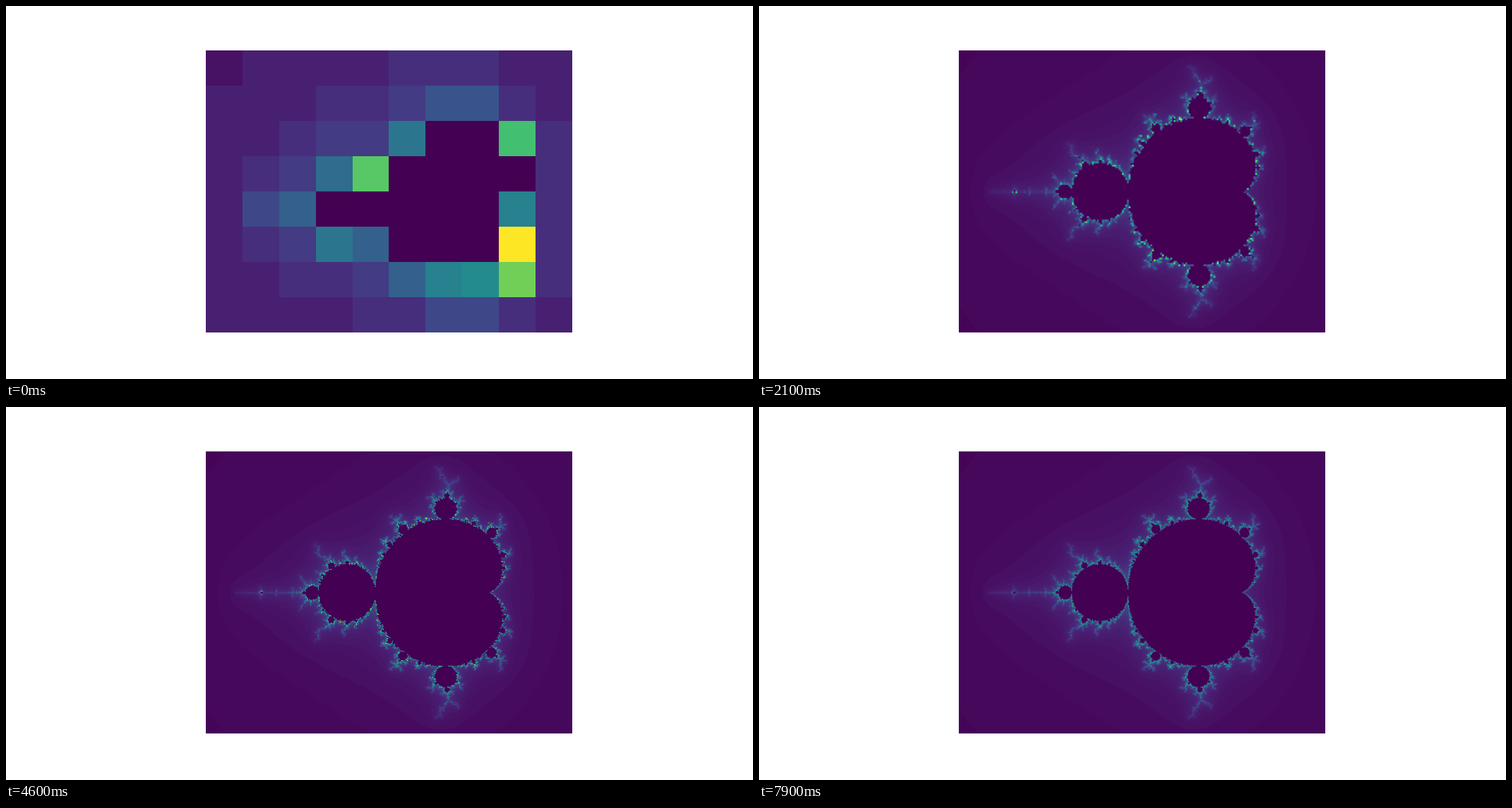
An HTML page with a canvas that plays this animation: 1058x529 px, repeating every 8 s.

```html
<!DOCTYPE html>
<html lang="en">
<head>
<meta charset="utf-8">
<title>Mandelbrot set at rising resolution</title>
<style>
  html, body { margin: 0; width: 100%; height: 100%; overflow: hidden; background: #fff; }
  canvas { position: absolute; left: 283px; top: 63px; display: block; }
</style>
</head>
<body>
<canvas id="plot" width="519" height="400"></canvas>
<script>
const W = 519, H = 400;
const STEPS = 80, STEP_MS = 100;
const LEFT = -2.25, TOP = -1.25, SPAN_X = 3.25, SPAN_Y = 2.5;
const MAX_ITER = 100, BAILOUT = 16;

const STOPS = ('440154 481568 482677 453781 3f4788 39558c 32648e 2d718e 287d8e 238a8d ' +
  '1f968b 20a386 29af7f 3cbc75 56c667 74d055 94d840 b8de29 dce318 fde725')
  .split(' ').map(h => parseInt(h, 16));

// 256 packed colours (ABGR byte order) blended between the stops
const palette = Uint32Array.from({ length: 256 }, (_, i) => {
  const pos = i / 255 * (STOPS.length - 1);
  const k = Math.min(Math.floor(pos), STOPS.length - 2);
  const mix = shift => {
    const a = STOPS[k] >> shift & 255, b = STOPS[k + 1] >> shift & 255;
    return Math.round(a + (b - a) * (pos - k));
  };
  return (255 << 24 | mix(0) << 16 | mix(8) << 8 | mix(16)) >>> 0;
});

// Steps before escape; 0 for points that stay bounded
function escapeTime(x, y) {
  const yy = y * y, d = x - 0.25, q = d * d + yy;
  if (q * (q + d) <= yy / 4 || (x + 1) * (x + 1) + yy <= 0.0625) return 0;
  let a = 0, b = 0;
  for (let i = 0; i < MAX_ITER; i++) {
    const t = a * a - b * b + x;
    b = 2 * a * b + y;
    a = t;
    if (a * a + b * b > BAILOUT) return i;
  }
  return 0;
}

function sampleGrid(cols) {
  const step = SPAN_X / cols, rows = Math.ceil(SPAN_Y / step);
  const data = new Float32Array(cols * rows);
  let max = 1;
  for (let j = 0; j < rows; j++) {
    let y = TOP + j * step;
    if (Math.abs(y) < 1e-9) y = 0;
    for (let i = 0; i < cols; i++) {
      const v = escapeTime(LEFT + i * step, y);
      data[j * cols + i] = v;
      if (v > max) max = v;
    }
  }
  return { cols, rows, data, max };
}

// For each output pixel: first source cell and its weights
function taps(size, count, smooth) {
  const scale = count / size, r = Math.max(1, scale);
  return Array.from({ length: size }, (_, p) => {
    const center = (p + 0.5) * scale - 0.5;
    if (!smooth) return { from: Math.floor(center + 0.5), weights: [1] };
    const from = Math.max(0, Math.ceil(center - r));
    const to = Math.min(count - 1, Math.floor(center + r));
    const weights = [];
    let sum = 0;
    for (let k = from; k <= to; k++) {
      const w = 0.5 + 0.5 * Math.cos(Math.PI * (k - center) / r);
      weights.push(w);
      sum += w;
    }
    return { from, weights: weights.map(w => w / sum) };
  });
}

const ctx = document.getElementById('plot').getContext('2d');
const image = ctx.createImageData(W, H);
const pixels = new Uint32Array(image.data.buffer);

function draw(step) {
  const { cols, rows, data, max } = sampleGrid(10 * (step + 1));
  const smooth = W <= 3 * cols;
  const across = taps(W, cols, smooth), down = taps(H, rows, smooth);

  const wide = new Float32Array(W * rows);
  for (let x = 0; x < W; x++) {
    const { from, weights } = across[x];
    for (let j = 0; j < rows; j++) {
      let v = 0;
      for (let k = 0; k < weights.length; k++) v += weights[k] * data[j * cols + from + k];
      wide[j * W + x] = v;
    }
  }

  for (let y = 0; y < H; y++) {
    const { from, weights } = down[y];
    for (let x = 0; x < W; x++) {
      let v = 0;
      for (let k = 0; k < weights.length; k++) v += weights[k] * wide[(from + k) * W + x];
      pixels[y * W + x] = palette[Math.min(255, Math.floor(v / max * 256))];
    }
  }
  ctx.putImageData(image, 0, 0);
}

const start = performance.now();
let shown = -1;

function tick() {
  const step = Math.floor((performance.now() - start) / STEP_MS) % STEPS;
  if (step !== shown) draw(shown = step);
  requestAnimationFrame(tick);
}
tick();
</script>
</body>
</html>
```
